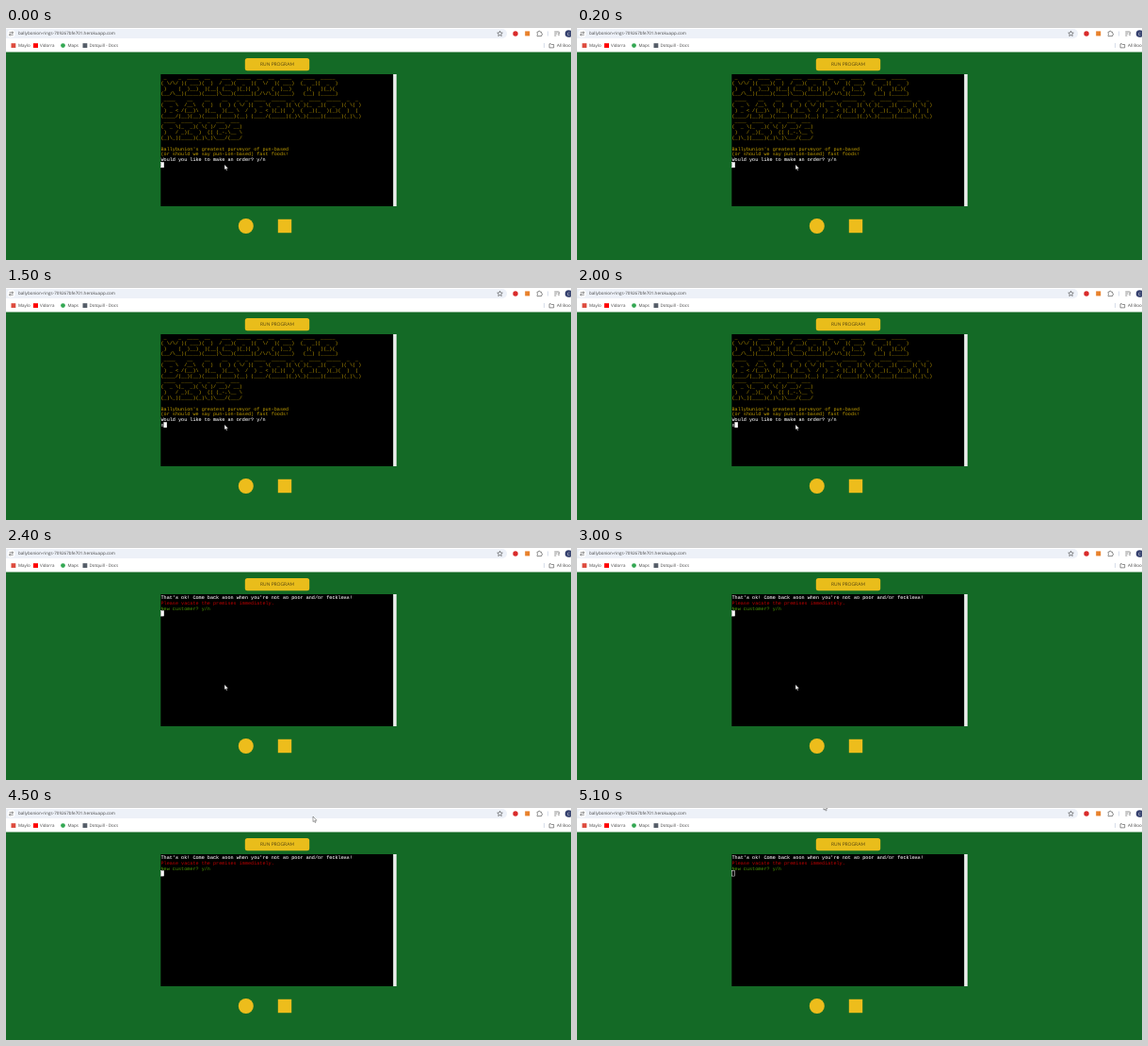
These frames come from a looping animation (600x246 px, 5200 ms). An HTML page:

```html
<!DOCTYPE html>
<html lang="en">
<head>
<meta charset="utf-8">
<title>Terminal order</title>
<style>
  html, body { margin: 0; width: 100%; height: 100%; overflow: hidden; background: #146a26; }
  svg { display: block; width: 600px; height: 246px; text-rendering: geometricPrecision; }
  text { font: 4.5px "Open Sans", sans-serif; fill: #444; }
  pre { margin: 0; color: #c4a000; font: 51.4px/58.3px "Liberation Mono", monospace; }
  .white { color: #fff; -webkit-text-stroke: .6px #fff; }
  .red { color: #c00000; }
  .green { color: #4e9a06; }
</style>
</head>
<body>
<svg viewBox="0 0 600 246">
  <rect width="600" height="246" fill="#146a26"/>

  <!-- Browser bars -->
  <rect width="600" height="25.5" fill="#fff"/>
  <rect x="-4" y="1" width="536" height="10" rx="5" fill="#edf1f8"/>
  <circle cx="5.5" cy="6" r="4" fill="#fff"/>
  <g fill="none" stroke="#444" stroke-width=".6">
    <path d="M3.5 4.8h2.2M5.5 7.2h2.2"/>
    <circle cx="6.8" cy="4.8" r=".8"/>
    <circle cx="4.3" cy="7.2" r=".8"/>
    <path d="M524.5 3.2l.8 1.8 2 .2-1.5 1.3.4 2-1.7-1-1.7 1 .4-2-1.5-1.3 2-.2z"/>
    <path d="M564 4.2h1.3a1 1 0 0 1 2 0h1.3v1.4a1 1 0 0 1 0 2v1h-4.6v-1.2a1 1 0 0 0 0-1.8z"/>
    <path d="M582.3 4h5M582.3 6h3M582.3 8h2M587 8.2V5h1.2"/>
    <path d="M577 16.8h1.7l.6.7h2.4v3.4H577z"/>
    <path d="M575.5 3.5v5M571.5 16v5" stroke="#bcc8dc"/>
  </g>
  <circle cx="541" cy="6" r="2.7" fill="#d92b2b"/>
  <rect x="551.2" y="3.4" width="5" height="5" fill="#e8812b"/>
  <circle cx="597.5" cy="6" r="3.8" fill="#34406e"/>
  <text x="596" y="7.5" style="fill:#fff">C</text>
  <text x="13" y="7.3" textLength="103">ballybonion-rings-709267bfe701.herokuapp.com</text>

  <rect x="5.5" y="16.2" width="4.8" height="4.8" fill="#dd4b3e"/>
  <text x="13" y="20">Maylo</text>
  <rect x="29" y="16.2" width="5" height="4.8" fill="#f00"/>
  <text x="36" y="20">Vidorra</text>
  <circle cx="60.5" cy="18.6" r="2.4" fill="#34a853"/>
  <text x="65.5" y="20">Maps</text>
  <rect x="81.5" y="16.2" width="4.8" height="4.8" fill="#555d68"/>
  <text x="88.5" y="20">Dotquill - Docs</text>
  <text x="585" y="20">All Bookmarks</text>

  <!-- Page -->
  <rect x="253.8" y="32" width="68.4" height="13.2" rx="2.5" fill="#e9bd1b"/>
  <text x="288" y="40.3" text-anchor="middle" style="font:4.9px Lato,sans-serif;fill:#5c4b12">RUN PROGRAM</text>
  <circle cx="254.8" cy="210" r="8" fill="#edbd1c"/>
  <rect x="288.8" y="202.8" width="14.4" height="14.4" fill="#edbd1c"/>

  <!-- Terminal, set at ten times its size so that lines land between pixels -->
  <rect x="164.3" y="49" width="247" height="140"/>
  <rect x="411.2" y="49" width="3.5" height="140" fill="#eee"/>
  <foreignObject width="2470" height="1390" transform="translate(164.5 49.6) scale(.1)">
<pre id="welcome"> _    _  ____  __    ___  _____  __  __  ____    ____  _____
( \/\/ )( ___)(  )  / __)(  _  )(  \/  )( ___)  (_  _)(  _  )
 )    (  )__)  )(__( (__  )(_)(  )    (  )__)     )(   )(_)(
(__/\__)(____)(____)\___)(_____)(_/\/\_)(____)   (__) (_____)
 ____    __    __    __   _  _  ____  _____  _  _  ____  _____  _  _
(  _ \  /__\  (  )  (  ) ( \/ )(  _ \(  _  )( \( )(_  _)(  _  )( \( )
 ) _ &lt; /(__)\  )(__  )(__ \  /  ) _ &lt; )(_)(  )  (  _)(_  )(_)(  )  (
(____/(__)(__)(____)(____)(__) (____/(_____)(_)\_)(____)(_____)(_)\_)
 ____  ____  _  _  ___  ___
(  _ \(_  _)( \( )/ __)/ __)
 )   / _)(_  )  (( (_-.\__ \
(_)\_)(____)(_)\_)\___/(___/

Ballybunion's greatest purveyor of pun-based
(or should we say pun-ion-based) fast foods!
<span class="white">Would you like to make an order? y/n
<span id="answer">n</span></span></pre>
<pre id="goodbye"><span class="white">That's ok! Come back soon when you're not so poor and/or feckless!</span>
<span class="red">Please vacate the premises immediately.</span>
<span class="green">New customer? y/n</span></pre>
  </foreignObject>
  <rect id="caret" width="2.9" height="5.4" stroke="#fff" stroke-width=".5"/>
  <path id="mouse" d="M0 0V5.6L1.3 4.5 2.2 6.5 3.1 6.1 2.3 4.2H4z" fill="#fff" stroke="#000" stroke-width=".35"/>
</svg>
<script>
  const LOOP = 5200, COL = 3.084, ROW = 5.83;
  const $ = id => document.getElementById(id);

  // Pointer positions: [start time, x, y]
  const pointer = [
    [0, 232, 144.7], [4200, 262, 122], [4300, 330, 72], [4400, 388, 28],
    [4500, 326, 9], [4600, 253, 2], [4800, 258, -1], [4900, 262, -3.5]
  ];

  function draw(t) {
    const typed = t >= 1500, left = t >= 2400, blurred = t >= 5100;
    $('welcome').style.display = left ? 'none' : 'block';
    $('goodbye').style.display = left ? 'block' : 'none';
    $('answer').style.visibility = typed ? 'inherit' : 'hidden';

    const col = typed && !left ? 1 : 0, row = left ? 3 : 16;
    $('caret').setAttribute('x', 164.7 + col * COL);
    $('caret').setAttribute('y', 49.2 + row * ROW);
    $('caret').setAttribute('fill', blurred ? 'none' : '#fff');

    const [, x, y] = pointer.findLast(p => p[0] <= t);
    $('mouse').setAttribute('transform', `translate(${x} ${y})`);
  }

  function tick() {
    draw(performance.now() % LOOP);
    requestAnimationFrame(tick);
  }
  tick();
</script>
</body>
</html>
```
